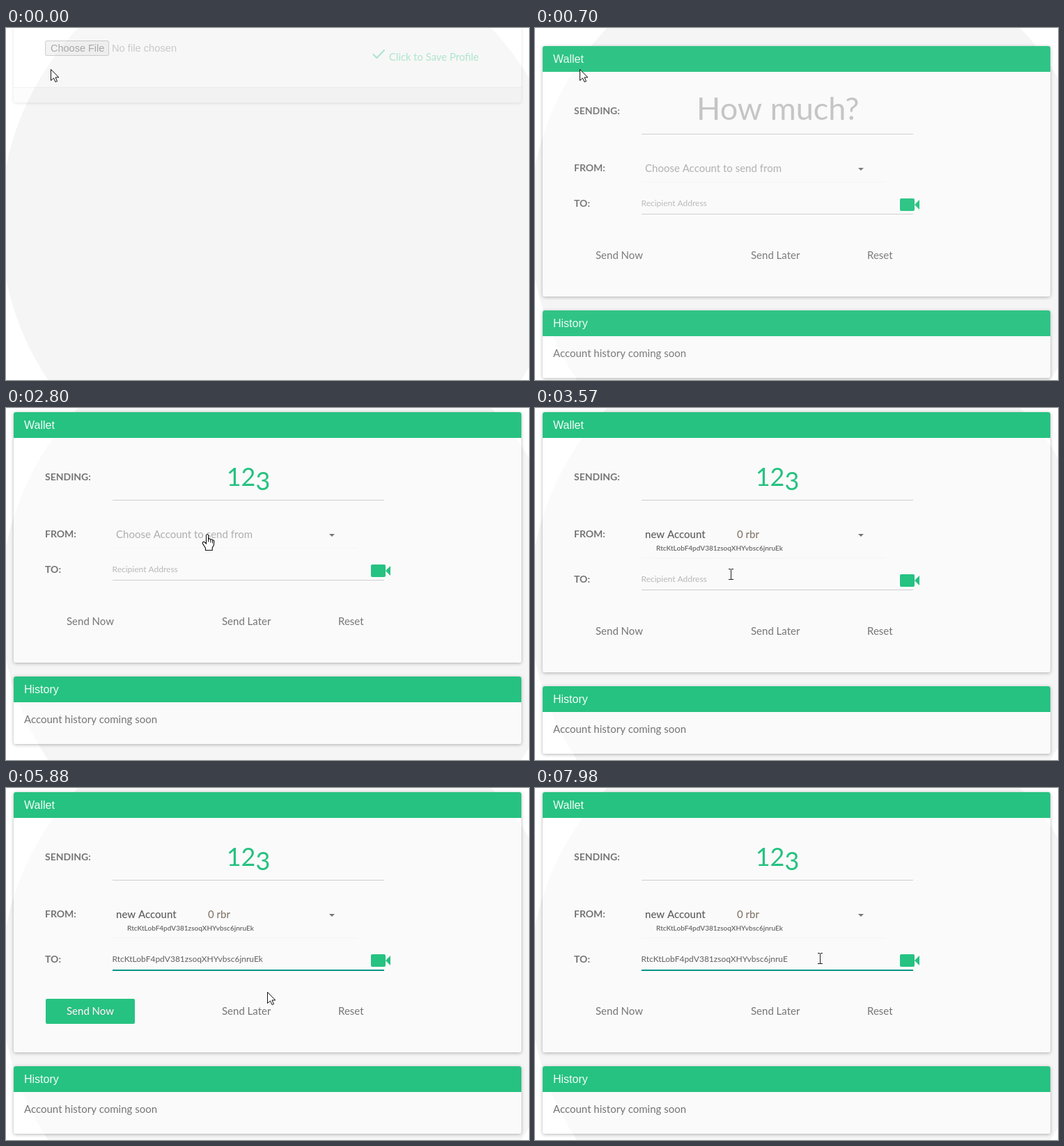
An HTML page with a canvas for the animation above (8 s loop, 751 by 506 pixels).

```html
<!DOCTYPE html>
<html lang="en">
<head>
<meta charset="utf-8">
<title>Wallet form</title>
<style>
  html, body { margin: 0; width: 100%; height: 100%; overflow: hidden; background: #fff; }
  canvas { display: block; }
</style>
</head>
<body>
<canvas id="stage" width="751" height="506"></canvas>
<script>
const ctx = document.getElementById('stage').getContext('2d');
const LOOP = 8000, STEP = 70;
const GREEN = '#26c281', TEAL = '#009688', GREY = '#757575';
const ADDRESS = 'RtcKtLobF4pdV381zsoqXHYvbsc6jnruEk';
const BODY = 'Lato, sans-serif', UI = '"Liberation Sans", sans-serif';

// Pointer path: time, x, y of the hot spot
const PATH = [
  [0, 64, 59], [840, 64, 59], [980, 201, 143], [1190, 290, 104],
  [2380, 290, 104], [2660, 289, 181], [2870, 289, 181], [3360, 281, 239],
  [3570, 281, 239], [4200, 429, 246], [5530, 429, 246], [5880, 375, 293],
  [6300, 122, 328], [6440, 122, 328], [7070, 409, 245]
];
// Pointer shape from each time on
const SHAPES = [
  [0, 'arrow'], [1120, 'beam'], [2520, 'hand'], [3500, 'beam'], [5600, 'arrow'],
  [6160, 'hand'], [6580, 'arrow'], [6930, 'beam']
];

const clamp = v => Math.max(0, Math.min(1, v));
const ramp = (t, from, length) => clamp((t - from) / length);
const within = (t, from, to) => t >= from && t < to;

// CSS "ease": cubic-bezier(.25, .1, .25, 1)
function ease(p) {
  const curve = (a, b, u) => 3 * a * u * (1 - u) ** 2 + 3 * b * u * u * (1 - u) + u ** 3;
  let lo = 0, hi = 1;
  for (let i = 0; i < 20; i++) {
    const mid = (lo + hi) / 2;
    if (curve(.25, .25, mid) < p) lo = mid; else hi = mid;
  }
  return curve(.1, 1, lo);
}

function text(str, x, y, size, color, weight = 400, family = BODY) {
  ctx.font = `${weight} ${size}px ${family}`;
  ctx.fillStyle = color;
  ctx.fillText(str, x, y);
}

function rect(x, y, w, h, color) {
  ctx.fillStyle = color;
  ctx.fillRect(x, y, w, h);
}

function round(x, y, w, h, r, color) {
  ctx.beginPath();
  ctx.roundRect(x, y, w, h, r);
  ctx.fillStyle = color;
  ctx.fill();
}

function poly(points, fill, stroke) {
  ctx.beginPath();
  points.forEach(([x, y]) => ctx.lineTo(x, y));
  ctx.closePath();
  ctx.fillStyle = fill;
  ctx.fill();
  if (stroke) {
    ctx.strokeStyle = stroke;
    ctx.lineWidth = 1;
    ctx.stroke();
  }
}

// Shadow outside the box only, so translucent cards stay clean
function shadow(x, y, w, h) {
  ctx.save();
  ctx.beginPath();
  ctx.rect(-50, -700, 900, 2000);
  ctx.roundRect(x, y, w, h, 3);
  ctx.clip('evenodd');
  ctx.shadowColor = 'rgba(0,0,0,.3)';
  ctx.shadowBlur = 5;
  ctx.shadowOffsetY = 1;
  round(x, y, w, h, 3, '#ddd');
  ctx.restore();
}

function card(title, y, h) {
  shadow(11, y, 729, h);
  round(11, y, 729, h, 3, 'rgba(255,255,255,.55)');
  round(11, y, 729, 37, [3, 3, 0, 0], GREEN);
  text(title, 26, y + 24, 16, 'rgba(255,255,255,.95)', 400, UI);
}

function underline(y, focus) {
  rect(153, y, 390, 1, '#cfcfcf');
  if (focus > 0) rect(348 - 195 * focus, y, 390 * focus, 2, TEAL);
}

// Old-style figures: 3 hangs below the baseline
function amount(str) {
  const size = 36;
  ctx.font = `400 ${size}px ${BODY}`;
  let x = 348 - ctx.measureText(str).width / 2;
  for (const digit of str) {
    text(digit, x, 112 + (digit === '3' ? 6 : 0), size, GREEN);
    x += ctx.measureText(digit).width;
  }
}

function account(y) {
  text('new Account', 158, y, 15, '#5c5c5c', 500);
  text('0 rbr', 290, y, 15, '#84786c', 500);
  text(ADDRESS, 174, y + 18, 10, '#666', 600);
}

function menu(t) {
  if (!within(t, 2870, 3500)) return;
  const open = ease(ramp(t, 2800, 280));
  const h = 129 * open;
  ctx.save();
  ctx.globalAlpha = open;
  shadow(152, 174, 352, h);
  round(152, 174, 352, h, 2, '#fff');
  ctx.beginPath();
  ctx.rect(152, 174, 352, h);
  ctx.clip();
  if (t >= 3150) rect(152, 218, 352, 62, '#eee');
  text('Choose Account to send from', 168, 202, 15, '#aaa');
  ctx.translate(10, 0);
  account(244);
  ctx.restore();
}

function sendButton(t, y) {
  const on = ramp(t, 5110, 280) - ramp(t, 7420, 280);
  ctx.save();
  ctx.globalAlpha *= on;
  round(57, y - 18, 128, 36, 2, within(t, 6160, 6580) ? '#22b277' : GREEN);
  ctx.restore();
  text('Send Now', 87, y + 5, 15, GREY);
  if (on > 0) text('Send Now', 87, y + 5, 15, `rgba(255,255,255,${on})`);
}

function recipient(t, y) {
  const str = t < 5180 ? '' : t < 7490 ? ADDRESS : ADDRESS.slice(0, -1);
  text(str || 'Recipient Address', 152.5, y, 12, str ? '#616161' : '#b8b8b8');
  if (within(t, 4200, 4900) || within(t, 5180, 5600) || within(t, 7490, 7980)) {
    const x = str ? 153 + ctx.measureText(str).width : 153;
    rect(Math.round(x), y - 10, 1, 13, '#333');
  }
}

function wallet(t) {
  const chosen = t >= 3500;
  const dy = chosen ? 14 : 0;

  card('Wallet', 6, 360 + dy);
  text('SENDING:', 56, 104, 14, GREY, 700);
  text('FROM:', 56, 186, 14, GREY, 700);
  text('TO:', 56, 237 + dy, 14, GREY, 700);

  const typed = t < 2030 ? 0 : t < 2170 ? 1 : t < 2310 ? 2 : 3;
  if (typed) amount('123'.slice(0, typed));
  else text('How much?', 232, 112, 45, '#c2c2c2');
  underline(132, t < 2800 ? ease(ramp(t, 1260, 280)) : 0);
  if (within(t, 1330, 2800)) rect(348 + typed * 10.5, 72, 1, 50, '#444');

  if (chosen) account(187);
  else text('Choose Account to send from', 158, 187, 15, '#aeaeae');
  rect(153, 201 + dy, 350, 1, 'rgba(0,0,0,.02)');
  poly([[464, 181], [472, 181], [468, 185]], GREY);

  recipient(t, 236 + dy);
  underline(247 + dy, ease(ramp(t, 4130, 280)));
  round(524, 225 + dy, 21, 18, 2, GREEN);
  poly([[545, 234 + dy], [552, 227 + dy], [552, 241 + dy]], GREEN);

  sendButton(t, 307 + dy);
  text('Send Later', 310, 312 + dy, 15, GREY);
  text('Reset', 477, 312 + dy, 15, GREY);

  card('History', 386 + dy, 97);
  text('Account history coming soon', 26, 453 + dy, 15, GREY);
  menu(t);
}

function profile(t) {
  const fade = (1 - ramp(t, 0, 280)) ** 2;
  if (!fade) return;
  ctx.save();
  ctx.globalAlpha = .35 * fade;
  shadow(11, -20, 729, 127);
  rect(11, 0, 729, 85, 'rgba(255,255,255,.5)');
  rect(11, 85, 729, 22, 'rgba(0,0,0,.03)');
  rect(11, 85, 729, 1, '#ddd');
  round(57, 19, 90, 20, 1, '#ddd');
  ctx.beginPath();
  ctx.roundRect(56.5, 18.5, 91, 21, 2);
  ctx.strokeStyle = '#777';
  ctx.lineWidth = 1;
  ctx.stroke();
  text('Choose File', 64, 34, 14.5, '#222', 400, UI);
  text('No file chosen', 152, 34, 14.7, GREY, 400, UI);
  ctx.beginPath();
  [[527, 37.5], [532.5, 43], [543.5, 31.5]].forEach(([x, y]) => ctx.lineTo(x, y));
  ctx.strokeStyle = GREEN;
  ctx.lineWidth = 2.2;
  ctx.stroke();
  text('Click to Save Profile', 550, 47, 14.8, GREEN);
  ctx.restore();
}

const pointers = {
  arrow() {
    poly([[.5, .5], [.5, 16.5], [4.5, 13], [7, 18.5], [9.5, 17.5], [7, 12], [11.8, 12]], '#fff', '#111');
  },
  beam() {
    rect(0, -7, 1, 15, '#222');
    [-8, 7].forEach(y => {
      rect(-3, y, 3, 1, '#222');
      rect(1, y, 3, 1, '#222');
    });
  },
  hand() {
    ctx.beginPath();
    ctx.moveTo(-1.5, 14);
    ctx.lineTo(-1.5, 1.8);
    ctx.quadraticCurveTo(0, -.8, 1.6, 1.8);
    ctx.lineTo(1.6, 7.5);
    ctx.quadraticCurveTo(4, 6, 4.8, 8.2);
    ctx.quadraticCurveTo(7, 7, 7.6, 9.2);
    ctx.quadraticCurveTo(9.8, 8.4, 9.8, 11);
    ctx.lineTo(9.4, 16);
    ctx.lineTo(7.2, 20);
    ctx.lineTo(7.2, 23.5);
    ctx.lineTo(-2.5, 23.5);
    ctx.lineTo(-2.5, 20.5);
    ctx.lineTo(-6.8, 13.5);
    ctx.quadraticCurveTo(-6.5, 10.5, -3.8, 11.8);
    ctx.closePath();
    ctx.fillStyle = '#fff';
    ctx.fill();
    ctx.strokeStyle = '#111';
    ctx.lineWidth = 1.1;
    ctx.stroke();
    [1.6, 4.8, 7.6].forEach((x, i) => rect(x - .5, 7.5 + i, 1, 4, '#111'));
  }
};

function pointer(t) {
  const next = PATH.findIndex(key => key[0] > t);
  let [, x, y] = PATH[PATH.length - 1];
  if (next > 0) {
    const [t0, x0, y0] = PATH[next - 1];
    const [t1, x1, y1] = PATH[next];
    const p = (t - t0) / (t1 - t0);
    x = x0 + (x1 - x0) * p;
    y = y0 + (y1 - y0) * p;
  }
  const shape = SHAPES.filter(key => key[0] <= t).pop()[1];
  ctx.save();
  ctx.translate(Math.round(x), Math.round(y));
  pointers[shape]();
  ctx.restore();
}

function draw(t) {
  rect(0, 0, 751, 506, '#fff');
  ctx.beginPath();
  ctx.arc(400, 280, 408, 0, Math.PI * 2);
  ctx.fillStyle = '#f5f5f5';
  ctx.fill();

  profile(t);

  const enter = ease(ramp(t, 105, 800));
  if (enter > 0) {
    ctx.save();
    ctx.globalAlpha = enter;
    ctx.translate(0, Math.round(478 * (1 - enter)));
    wallet(t);
    ctx.restore();
  }
  pointer(t);
}

function tick() {
  const t = performance.now() % LOOP;
  draw(Math.floor(t / STEP) * STEP);
  requestAnimationFrame(tick);
}
tick();
</script>
</body>
</html>
```
